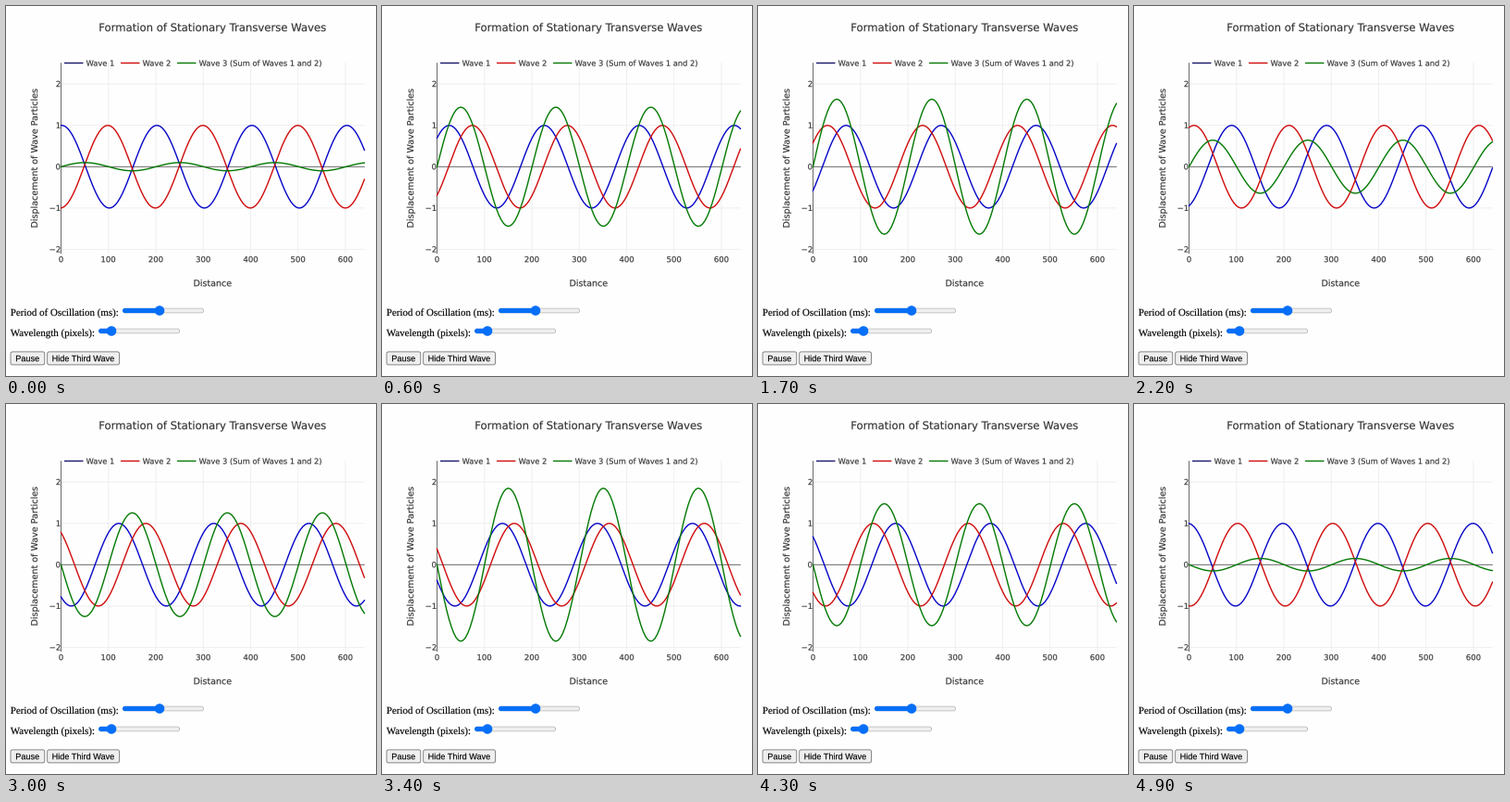
Write a matplotlib script that moves like this. It is 400 by 399 pixels and loops after 5 s.

```python
import numpy as np
import matplotlib.pyplot as plt
from matplotlib.animation import FuncAnimation
from matplotlib.patches import Circle, FancyBboxPatch, PathPatch, Rectangle
from matplotlib.textpath import TextPath
from matplotlib.transforms import Affine2D

W, H, DPI = 400, 399, 100
FRAMES, INTERVAL = 50, 100
PX = 72 / DPI  # points per pixel

LEFT, RIGHT, TOP, BOTTOM = 59.5, 387.4, 61.7, 266.7
ORIGIN_Y, UNIT_X, UNIT_Y = 173.3, 0.5124, 44.6
WAVELENGTH, LEAD = 200.5, 0.05
INK, ACCENT = "#333333", "#066ff8"
SANS, SERIF, ARIAL = "DejaVu Sans", "Liberation Serif", "Liberation Sans"
BLUE, RED, GREEN = "#0606c8", "#d00c0c", "#047a04"

fig = plt.figure(figsize=(W / DPI, H / DPI), dpi=DPI, facecolor="#fefefe")
ax = fig.add_axes([0, 0, 1, 1])
ax.set_xlim(0, W)
ax.set_ylim(H, 0)
ax.axis("off")


def px(x):
    return LEFT + np.asarray(x) * UNIT_X


def py(y):
    return ORIGIN_Y - np.asarray(y) * UNIT_Y


def label(x, y, text, size, font=SANS, color=INK, align="left", angle=0):
    """Draw text as outlines, so that it sits at fractions of a pixel."""
    path = TextPath((0, 0), text, size=size, prop={"family": [font]})
    box = path.get_extents()
    shift = {"left": 0, "center": -(box.x0 + box.x1) / 2, "right": -box.x1}
    place = (Affine2D().translate(shift[align], 0).rotate_deg(angle)
             .scale(1, -1).translate(x, y))
    ax.add_patch(PathPatch(path.transformed(place), fc=color, ec=color,
                           lw=0.15 * PX, snap=False, zorder=3))


def line(xs, ys, color, width, **kw):
    return ax.plot(xs, ys, color=color, lw=width * PX, snap=False, **kw)[0]


def rounded(x, y, w, h, radius, face, edge, width=0.7):
    ax.add_patch(FancyBboxPatch(
        (x, y), w, h, boxstyle=f"round,pad=0,rounding_size={radius}",
        fc=face, ec=edge, lw=width * PX, snap=False))


def slider(x, y, thumb):
    rounded(x + 0.4, y - 2.4, 87.4, 4.8, 2.4, "#efefef", "#b4b4b4")
    rounded(x + 0.2, y - 2.6, thumb - x, 5.2, 2.6, ACCENT, "none", 0)
    ax.add_patch(Circle((thumb, y), 5.3, fc=ACCENT, ec="none"))


def button(x, w, text):
    rounded(x, 372.9, w, 14, 2, "#efefef", "#6c6c6c", 0.8)
    label(x + w / 2, 383.2, text, 9.15, ARIAL, "black", "center")


def draw_chart():
    for x in range(100, 700, 100):
        line([px(x)] * 2, [TOP, BOTTOM], "#ececec", 0.8)
    for y in (-2, -1, 1, 2):
        line([LEFT, RIGHT], [py(y)] * 2, "#ececec", 0.8)
    line([LEFT, RIGHT], [ORIGIN_Y] * 2, "#5a5a5a", 0.9)
    line([LEFT] * 2, [TOP, BOTTOM], "#5a5a5a", 0.9)

    for x in range(0, 700, 100):
        label(px(x), 276.2, str(x), 8.5, align="center")
    for y in range(-2, 3):
        label(58.4, py(y) + 3, str(y).replace("-", "\u2212"), 8.5,
              align="right")

    label(223.5, 27.2, "Formation of Stationary Transverse Waves", 11.65,
          align="center")
    label(223.5, 302.2, "Distance", 9.5, align="center")
    label(34, 164, "Displacement of Wave Particles", 9.55,
          align="center", angle=90)

    names = ("Wave 1", "Wave 2", "Wave 3 (Sum of Waves 1 and 2)")
    for i, (name, color) in enumerate(zip(names, ("#16166a", RED, GREEN))):
        x = 63 + 61 * i
        line([x, x + 20.5], [61.5] * 2, color, 1.4, solid_capstyle="butt")
        label(x + 23.6, 64.6, name, 8.3)


def draw_controls():
    label(4.8, 334, "Period of Oscillation (ms):", 10.94, SERIF, "black")
    slider(125.8, 328.5, 166)
    label(4.8, 356, "Wavelength (pixels):", 10.94, SERIF, "black")
    slider(99.9, 350.5, 114)
    button(5, 36.8, "Pause")
    button(44.7, 77.8, "Hide Third Wave")


draw_chart()
draw_controls()

distance = np.arange(0, 641, 5)
kx = 2 * np.pi * distance / WAVELENGTH
plot_area = Rectangle((LEFT, TOP), RIGHT - LEFT, BOTTOM - TOP,
                      transform=ax.transData)
curves = [line([], [], color, 1.4, clip_path=plot_area)
          for color in (BLUE, RED, GREEN)]


def update(frame):
    phase = LEAD + 2 * np.pi * frame / FRAMES
    forward = np.cos(kx - phase)
    backward = -np.cos(kx + phase)
    for curve, wave in zip(curves, (forward, backward, forward + backward)):
        curve.set_data(px(distance), py(wave))
    return curves


anim = FuncAnimation(fig, update, frames=FRAMES, interval=INTERVAL,
                     repeat=True, repeat_delay=0)
plt.show()
```
